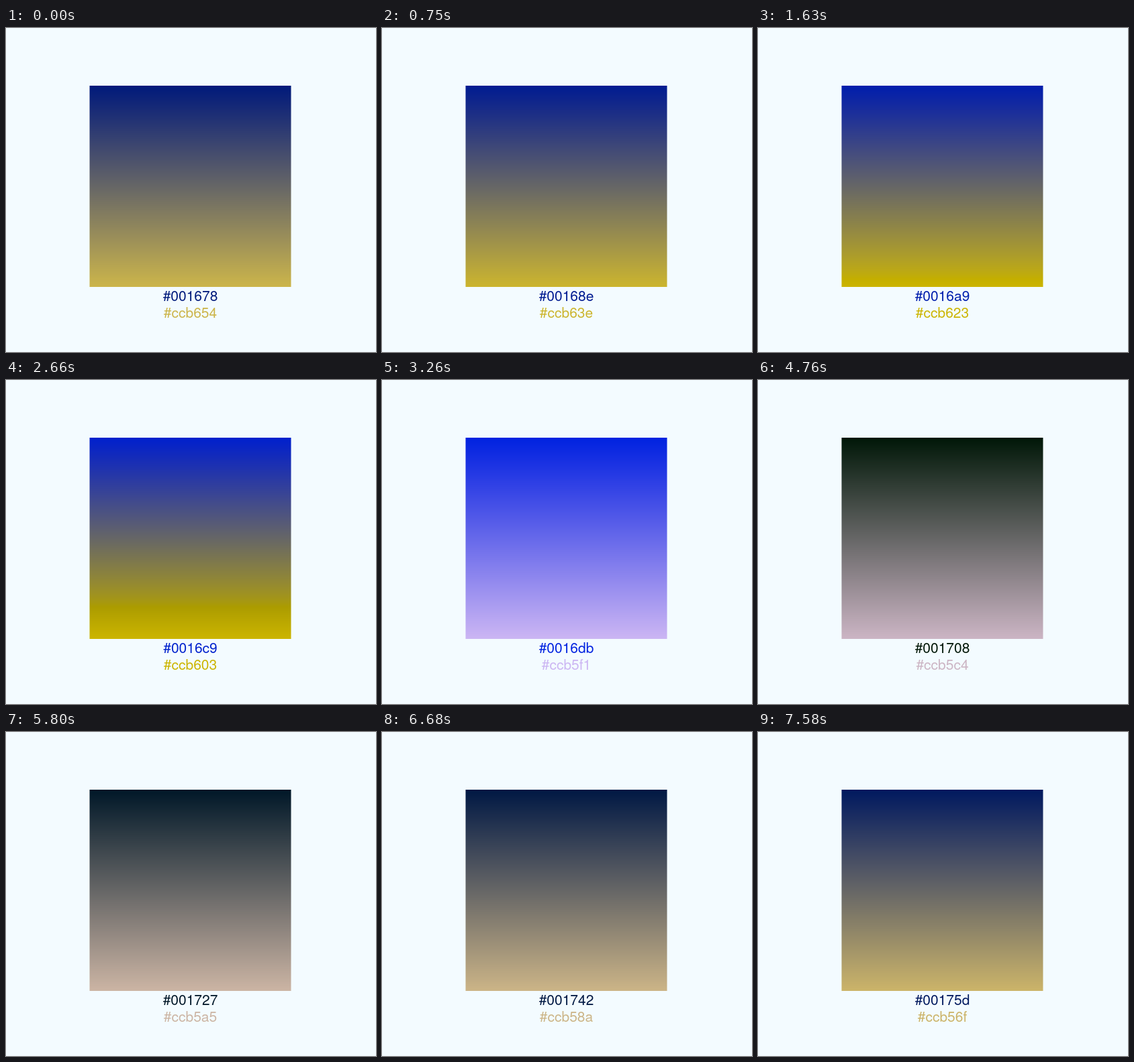
Recreate the animation shown at these times as an HTML page with a canvas. Size 551 px wide and 483 px high, loop 7670 ms.

```html
<!DOCTYPE html>
<html lang="en">
<head>
<meta charset="utf-8">
<title>Gradient counter</title>
<style>
  html, body { margin: 0; width: 100%; height: 100%; overflow: hidden; background: #f3fbff; }
  canvas { display: block; }
</style>
</head>
<body>
<canvas id="stage" width="551" height="483"></canvas>
<script>
const ctx = document.getElementById('stage').getContext('2d');
const LOOP = 7670, STEPS = 52;
const BOX = { x: 124.5, y: 86, size: 300 };
const SHORT_STEPS = [5, 10, 13, 17, 35, 39, 43];

// Step start times: 150 ms each, a few last 140 ms.
const starts = [0];
for (let i = 0; i < STEPS - 1; i++) {
  starts.push(starts[i] + (SHORT_STEPS.includes(i) ? 140 : 150));
}

const channels = n => [n >> 16, n >> 8 & 255, n & 255];
const hex = n => '#' + n.toString(16).padStart(6, '0');

const toLinear = v => (v /= 255) <= 0.04045 ? v / 12.92 : ((v + 0.055) / 1.055) ** 2.4;
function toByte(v) {
  v = Math.min(1, Math.max(0, v));
  return Math.round(255 * (v <= 0.0031308 ? v * 12.92 : 1.055 * v ** (1 / 2.4) - 0.055));
}

// Colours as seen on a slightly wider display gamut.
function display(rgb) {
  const [r, g, b] = rgb.map(toLinear);
  const out = [r, 0.988 * g + 0.012 * b, 1.05 * b - 0.01 * r - 0.04 * g];
  return `rgb(${out.map(toByte)})`;
}

function label(n, y) {
  ctx.fillStyle = display(channels(n));
  ctx.fillText(hex(n), 274.5, y);
}

function draw(step) {
  const count = Math.floor(step * 4.5);
  const top = 0x001678 + count, bottom = 0xccb654 - count;
  const from = channels(top), to = channels(bottom);

  ctx.fillStyle = '#f3fbff';
  ctx.fillRect(0, 0, 551, 483);
  for (let row = 0; row < BOX.size; row++) {
    const mix = (row + 0.5) / BOX.size;
    ctx.fillStyle = display(from.map((v, k) => v + (to[k] - v) * mix));
    ctx.fillRect(BOX.x, BOX.y + row, BOX.size, 1);
  }

  ctx.font = '21px "Helvetica Neue", "Liberation Sans", Arial, sans-serif';
  ctx.textAlign = 'center';
  label(top, 407);
  label(bottom, 432);
}

let shown = -1;
function tick() {
  const time = performance.now() % LOOP;
  const step = starts.filter(s => s <= time).length - 1;
  if (step !== shown) draw(shown = step);
  requestAnimationFrame(tick);
}
tick();
</script>
</body>
</html>
```
